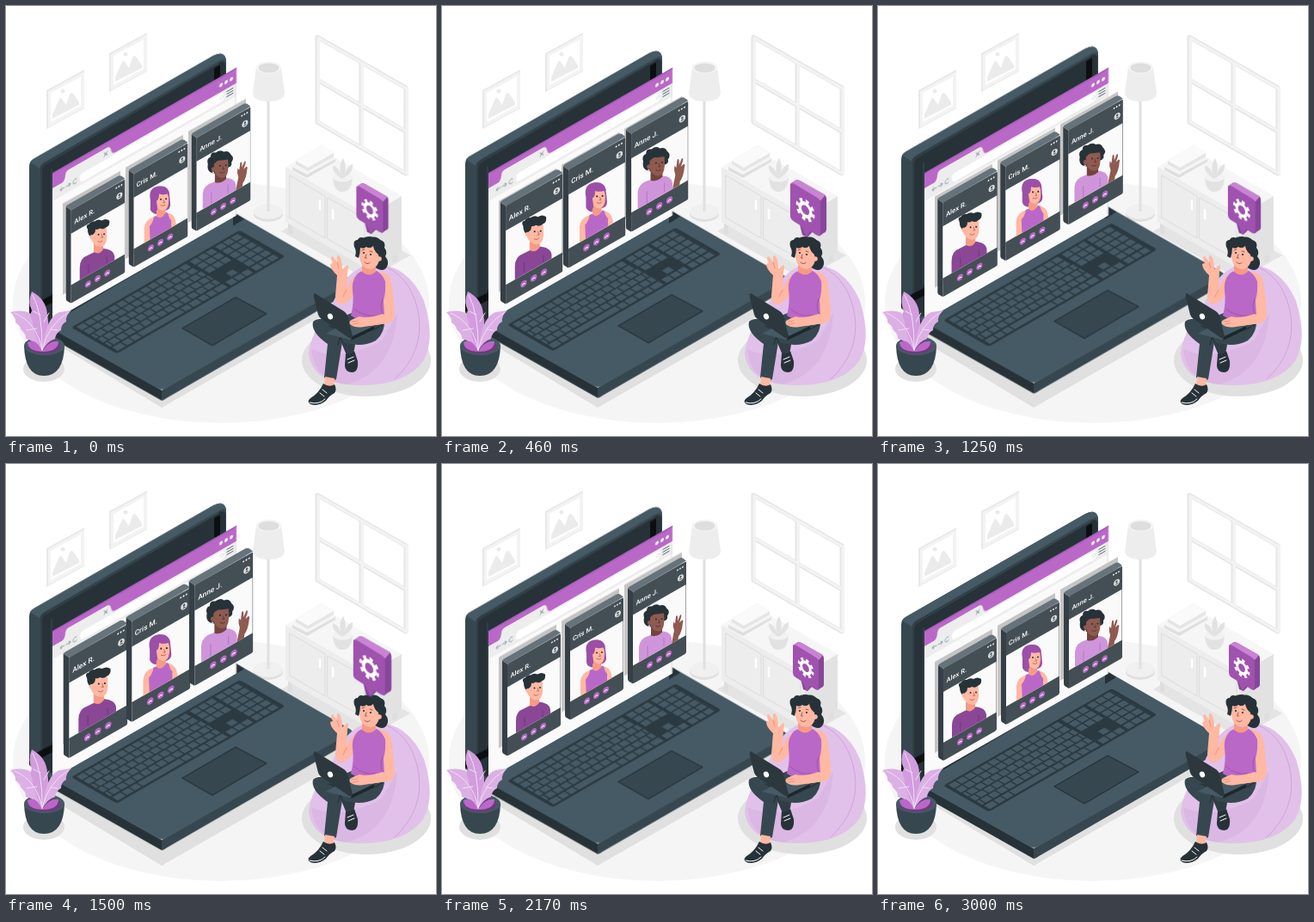
An HTML page without scripts that plays this animation: 500 px wide and 500 px high, repeating every 3.04 s.

```html
<!DOCTYPE html>
<html lang="en">
<head>
<meta charset="utf-8">
<title>Video call</title>
<style>
html, body { margin: 0; width: 100%; height: 100%; overflow: hidden; background: #fff; }
svg { display: block; width: 100%; height: 100%; }
.float, .beat, .pulse { animation: float 3.04s linear -40ms infinite; }
.beat { animation-name: beat; transform-origin: 104px 272px; }
.pulse { animation-name: beat; --peak: 1.25; transform-origin: 426px 236px; }
@keyframes float { 50% { transform: translateY(-10px); } }
@keyframes beat {
  0%, 30%, 40%, 60%, 100% { transform: scale(1); }
  10%, 50% { transform: scale(var(--peak, 1.1)); }
}
.name { font: 500 7.6px Roboto, Arial, sans-serif; fill: #fff; }
.keys path { fill: none; stroke: #455a64; stroke-width: 7.6; stroke-dasharray: 9 1.6; }
.line { fill: none; stroke-linecap: round; stroke-linejoin: round; }
</style>
</head>
<body>
<svg viewBox="0 0 500 500">
<defs>
  <clipPath id="photo"><path d="M76 265L138 229.500V288.500L76 324Z"/></clipPath>
  <path id="shade" d="M66 230L133 192V298L66 336Z" fill="#c4c4c4"/>
  <g id="btn"><circle r="3.500" fill="#ba68c8"/><path class="line" d="M-1.500.8Q0-1 1.500.8" stroke="#fff"/></g>
  <g id="card">
    <path d="M70 234L76 238V345L71 342Q70 341 70 339Z" fill="#353f45"/>
    <path d="M70 234L72 232L130 199Q132 198 134 199L138 202L76 238Z" fill="#66737a"/>
    <g transform="matrix(1 -.572 0 1 76 238)">
      <rect width="62" height="107" rx="1.500" fill="#444f55"/>
      <rect width="61.500" y="27" height="59" fill="#fafafa"/>
      <g fill="#fff"><circle cx="52" cy="4.500" r=".9"/><circle cx="55" cy="4.500" r=".9"/><circle cx="58" cy="4.500" r=".9"/>
      <circle cx="55.500" cy="15.500" r="3.500" fill="#e0e0e0"/></g>
      <circle cx="55.500" cy="14.500" r="1.200" fill="#444f55"/><path d="M53.500 17.500q2-2.500 4 0z" fill="#444f55"/>
      <use href="#btn" x="19.500" y="96"/><use href="#btn" x="30.500" y="96"/><use href="#btn" x="41.500" y="96"/>
    </g>
  </g>
  <g id="pic">
    <path d="M47 98L91 74V119L47 143Z" fill="#e8e8e8"/>
    <path d="M49 99L91 76V118L49 141Z" fill="#f3f3f3"/>
    <path d="M52 101L87 82V116L52 135Z" fill="#fff"/>
    <path d="M54 131V126L62 108Q64 105 67 111L70 115L74 103Q76 99 79 103L85 112V115Z" fill="#ebebeb"/>
    <circle cx="66" cy="99" r="2.500" fill="#ebebeb"/>
  </g>
</defs>

<rect width="500" height="500" fill="#fff"/>
<ellipse cx="250" cy="345" rx="242" ry="140" fill="#f5f5f5"/>

<!-- wall -->
<use href="#pic"/><use href="#pic" x="73" y="-43"/>
<g class="line" stroke-linecap="butt">
  <path d="M362 36L465 95V195L362 135ZM413 66V165M362 86L465 146" stroke="#e6e6e6" stroke-width="5"/>
  <path d="M363 37L466 96V195L363 135ZM414 66V165M363 86L466 146" stroke="#f3f3f3" stroke-width="3"/>
</g>

<!-- lamp -->
<ellipse cx="305" cy="242" rx="17" ry="9" fill="#e0e0e0"/><ellipse cx="305" cy="239" rx="17" ry="9" fill="#f0f0f0"/>
<path d="M303.500 105H306.500V238Q305 240 303.500 238Z" fill="#e0e0e0"/>
<path d="M291 71L287 102Q289 111 305 111Q322 111 324 102L320 71Z" fill="#ededed"/>
<ellipse cx="305.500" cy="71.500" rx="14.500" ry="7" fill="#f5f5f5"/><ellipse cx="305.500" cy="72" rx="12" ry="5.500" fill="#dedede"/>

<!-- sideboard -->
<path d="M320 262L420 318L470 290L370 232Z" fill="#e4e4e4"/>
<path d="M328 250V264L333 266V252ZM415 298V312L421 314V300ZM449 286V299L455 296V282Z" fill="#dedede"/>
<path d="M325 187L422 243V307L325 251Z" fill="#ededed"/>
<path d="M422 243L460 221V285L422 307Z" fill="#e2e2e2"/>
<path d="M325 187L363 165L460 221L422 243Z" fill="#f6f6f6"/>
<path class="line" d="M330 197L371 221V270L330 246ZM374 223L417 247V295L374 271Z" stroke="#dcdcdc"/>
<path class="line" d="M365 227V236M380 237V247" stroke="#fff" stroke-width="2.500"/>
<path d="M333 187L366 168L383 178V181L350 200L333 191Z" fill="#dfdfdf"/><path d="M333 187L366 168L383 178L350 196Z" fill="#f5f5f5"/>
<path d="M337 180L367 162L381 171V175L351 192L337 184Z" fill="#e5e5e5"/><path d="M337 180L367 162L381 171L351 188Z" fill="#fafafa"/>
<path d="M380 199Q381 216 391 216Q402 216 403 199Z" fill="#e2e2e2"/><ellipse cx="391.500" cy="199" rx="11.500" ry="5.500" fill="#f2f2f2"/>
<path d="M391 201Q378 193 380 185Q386 187 389 195Q387 183 392 177Q396 184 394 195Q397 185 403 184Q405 193 391 201Z" fill="#e2e2e2"/>

<path d="M40 382L181 467L408 337L270 258Z" fill="#e0e0e0"/>

<!-- laptop -->
<g class="float">
  <path d="M27 352V187Q27 181 32 178L241 58Q256 51 256 66V258L52 376L27 360Z" fill="#37474f"/>
  <path d="M28 182Q29 180 32 178L241 58Q254 51 256 63Q253 61 248 64L46 181Q40 184 39 189Z" fill="#455a64"/>
  <path d="M40 362V193Q40 186 45 183L248 66Q255 63 255 70V250L54 370Z" fill="#263238"/>
  <path d="M242 73L248 69Q249 69 249 71V95H242ZM27 350L54 336V345L27 359Z" fill="#0b0f11"/>
  <path class="line" d="M41 342V193Q41 187 46 184L247 67M53 333V190" stroke="#43545c" stroke-width=".8"/>

  <path d="M48 372L181 447V459L52 386Q48 384 48 380Z" fill="#263238"/>
  <path d="M181 447L403 320V328Q403 331 400 333L187 456Q183 459 181 459Z" fill="#37474f"/>
  <path d="M50 371L262 246L268 242L400 318Q404 320 400 323L187 444Q181 448 175 444L50 374Z" fill="#455a64"/>
  <path d="M264 239L268 242L277 248L264 256Z" fill="#263238"/>
  <g transform="matrix(.866 -.5 .866 .5 76 374)">
    <rect width="226" height="61" rx="3" fill="#2b3940"/>
    <g class="keys">
      <path d="M4 6.500H152M4 16H152" />
      <path d="M4 25.500H152" stroke-dashoffset="-5"/>
      <path d="M4 35H152" stroke-dashoffset="3"/>
      <path d="M4 44.500H152" stroke-dashoffset="6"/>
      <path d="M4 54.500H152" style="stroke-dasharray:11 1.600 9 1.600 9 1.600 56 1.600 9 1.600"/>
      <path d="M156 6.500H186M156 16H186M156 25.500H186M156 54.500H186M166.600 44.500H175.600"/>
      <path d="M190 6.500H222M190 16H222M190 25.500H222M190 35H222M190 44.500H222M190 54.500H222"/>
    </g>
  </g>
  <path d="M205 375L267 339L303 358L240 395Z" fill="#37474f" stroke="#263238" stroke-width="1.200" stroke-linejoin="round"/>
</g>

<!-- browser window -->
<g transform="matrix(1 -.572 0 1 54 194)">
  <rect width="214" height="172" fill="#fafafa"/>
  <rect width="214" y="16" height="17" fill="#ededed"/>
  <rect width="214" height="18" fill="#ba68c8"/>
  <path d="M0 0H214V2H0Z" fill="#a95db8"/>
  <path d="M11 18Q14 18 15 12Q15 7 19 7H63Q67 7 68 12Q69 18 73 18Z" fill="#ededed"/>
  <path class="line" d="M60 11.500l4 4m0-4l-4 4" stroke="#546e7a" stroke-width=".8"/>
  <g fill="#fff"><circle cx="196" cy="10" r="2"/><circle cx="202" cy="10" r="2"/><circle cx="208" cy="10" r="2"/></g>
  <rect x="32" y="20" width="168" height="10" rx="4" fill="#fff"/>
  <circle cx="197" cy="25" r="1.800" class="line" stroke="#cfcfcf" stroke-width=".6"/>
  <path class="line" d="M203 21.500H210M203 24.500H210M203 27.500H210" stroke="#546e7a" stroke-width="1.200"/>
  <path class="line" d="M14 25H9l2-2m-2 2l2 2M16 25h5l-2-2m2 2l-2 2M28 23a2.500 2.500 0 1 0 0 4" stroke="#78909c" stroke-width=".8"/>
  <path d="M213 18V172" stroke="#e0e0e0"/>
</g>

<!-- call cards -->
<g class="float">
  <use href="#shade"/><use href="#shade" x="73" y="-42"/><use href="#shade" x="146" y="-84"/>

  <g class="beat">
    <use href="#card"/>
    <text class="name" transform="matrix(1 -.572 0 1 79.500 254.500)">Alex R.</text>
    <g clip-path="url(#photo)">
      <path d="M86 326V304Q86 293 95 290L103 286L112 282Q125 283 126 291V310Z" fill="#8a4796"/>
      <path class="line" d="M96 310V300M117 299V292" stroke="#71387c"/>
      <path d="M102 273V286Q108 290 113 283V275Z" fill="#f59b85"/>
      <path d="M98 260Q99 254 109 253Q118 254 117 265Q118 279 110 280Q101 280 98 268Z" fill="#ffb8a2"/>
      <path d="M95 260Q92 255 97 254Q98 250 103 251Q107 248 111 250Q116 247 120 250Q121 256 116 258Q113 261 109 259Q106 261 104 260Q104 265 101 266L100 270Q95 267 95 260Z" fill="#263238"/>
      <circle cx="100" cy="269" r="2.600" fill="#ffb8a2"/>
      <g fill="#263238"><circle cx="107.500" cy="266" r="1"/><circle cx="114" cy="265.500" r="1"/></g>
      <path class="line" d="M111 266l1.500 3.500h-2M107 274q3 2 5-.5" stroke="#b75b50" stroke-width=".8"/>
    </g>
  </g>

  <g transform="translate(73 -42)"><g class="beat">
    <use href="#card"/>
    <text class="name" transform="matrix(1 -.572 0 1 79 253.500)">Cris M.</text>
    <g clip-path="url(#photo)"><g transform="translate(-73 42)">
      <path d="M168 226Q165 212 177 210Q189 209 190 221L191 231Q191 237 185 238L174 242Q167 240 168 234Z" fill="#9b4fa9"/>
      <path d="M161 280V258Q162 248 173 245L185 240Q195 241 197 250L199 264Z" fill="#ffb8a2"/>
      <path d="M168 280L167 256Q171 252 172 245L175 244Q180 249 186 240L188 241Q190 248 192 249V270Z" fill="#ba68c8"/>
      <path d="M175 232V244Q180 249 185 241V232Z" fill="#f59b85"/>
      <path d="M174 222Q175 214 181 215Q189 215 189 226Q189 238 182 238Q175 237 174 227Z" fill="#ffb8a2"/>
      <path d="M172 232Q166 218 175 211Q187 207 190 218Q183 221 178 219Q178 226 175 227L176 234Q177 240 171 240Z" fill="#9b4fa9"/>
      <g fill="#263238"><circle cx="180" cy="225" r="1"/><circle cx="186" cy="224.500" r="1"/></g>
      <path class="line" d="M183 226l1.500 3h-2M180 232q3 1.500 5-.5" stroke="#b75b50" stroke-width=".8"/>
    </g></g>
  </g></g>

  <g transform="translate(146 -84)"><g class="beat">
    <use href="#card"/>
    <text class="name" transform="matrix(1 -.572 0 1 79.500 254)">Anne J.</text>
    <g clip-path="url(#photo)"><g transform="translate(-146 84)">
      <path d="M229 241V218Q230 208 241 205L255 200Q266 200 267 208V225Z" fill="#cf95da"/>
      <path class="line" d="M239 232V217M258 217V208" stroke="#b477c0"/>
      <path d="M267 214L270 199Q268 194 269 189L271 191L272 183Q273 180 274 183V188L277 181Q279 180 278 184L276 190L279 187Q281 187 280 190Q279 201 275 206L274 215Z" fill="#8f5a50"/>
      <path d="M243 191V205Q250 207 256 201V192Z" fill="#73443d"/>
      <path d="M235 184Q233 178 238 176Q238 170 244 171Q249 167 253 170Q259 168 261 173Q266 177 262 182Q263 187 258 188L243 195Q233 194 235 184Z" fill="#263238"/>
      <path d="M242 184Q246 179 250 180L258 179Q260 199 252 200Q244 200 242 191Z" fill="#8f5a50"/>
      <circle cx="241.500" cy="190" r="2.500" fill="#8f5a50"/><circle cx="241" cy="194" r="1.200" fill="#e1bee7"/>
      <g fill="#263238"><circle cx="249" cy="186" r="1"/><circle cx="255.500" cy="185.500" r="1"/></g>
      <path class="line" d="M252 187l1.500 3h-2M249 194q3 1.500 5-.5" stroke="#56302b" stroke-width=".8"/>
    </g></g>
  </g></g>
</g>

<!-- plant -->
<ellipse cx="44" cy="422" rx="24" ry="15" fill="#e0e0e0"/>
<path d="M21 395Q22 430 44 430Q67 430 68 395Z" fill="#37474f"/>
<ellipse cx="44.500" cy="395" rx="23.500" ry="11" fill="#455a64"/><ellipse cx="44.500" cy="396" rx="19" ry="8" fill="#71387c"/>
<g fill="#dcb0e5">
  <path d="M42 401Q32 388 23 387Q24 382 17 376Q17 372 11 368Q12 363 5 356Q25 351 35 363Q44 374 42 401Z"/>
  <path d="M42 402Q31 377 31 367Q27 360 30 354Q25 344 30 332Q47 341 48 359Q52 377 42 402Z" fill="#d29ddd"/>
  <path d="M42 402Q46 362 62 356L76 354Q69 360 70 367Q64 370 64 377Q58 380 57 387Q47 390 42 402Z"/>
  <path d="M42 402Q25 401 25 391Q35 385 42 402Z" fill="#ba68c8"/>
  <path d="M42 402Q50 388 61 390Q61 402 42 402Z" fill="#ba68c8"/>
</g>
<path class="line" d="M42 400Q36 368 10 357M42 400Q43 358 31 336M42 400Q49 370 73 356M36 375l-12 2M40 359l-8-4M44 367l6-10M52 376l8 1" stroke="#f1dff5"/>

<!-- bean bag -->
<ellipse cx="419" cy="412" rx="75" ry="42" fill="#e0e0e0"/>
<path d="M352 404Q354 380 377 354Q394 302 428 300Q468 301 486 343Q500 388 485 413Q464 441 414 441Q356 441 352 404Z" fill="#e1c1e9"/>
<path d="M355 399Q389 415 437 389L455 357Q451 424 397 440Q359 437 355 399Z" fill="#dbb7e4"/>
<path class="line" d="M443 304Q473 318 480 360Q486 402 452 434" stroke="#d0a3db"/>

<!-- woman -->
<path d="M385 374L407 388L404 405L396 406L391 394Z" fill="#2f3d44"/>
<path d="M395 404Q402 406 405 401L409 413Q410 426 402 426Q394 425 394 418Z" fill="#263238"/>
<path class="line" d="M397 411l7-3M398 415l7-3" stroke="#fff"/>
<path d="M402 357L440 364Q441 380 430 389Q414 398 391 391L384 434Q377 438 370 432L374 393Q354 379 357 367Q364 361 379 366Z" fill="#37474f"/>
<path class="line" d="M438 370Q423 382 396 379Q388 381 386 394M376 372Q388 376 391 391" stroke="#263238" stroke-width="1.300"/>
<path d="M371 431L382 433L381 444H370Z" fill="#ffb8a2"/>
<path d="M369 439Q376 444 382 440Q385 446 382 450Q376 453 372 459Q363 466 354 463Q349 460 354 456Q364 450 369 439Z" fill="#263238"/>
<path class="line" d="M365 450l5 4M368 446l5 4M353 461Q364 464 371 457" stroke="#fff"/>
<path d="M409 311L401 319L396 329L397 309Q399 302 397 301L391 306Q391 294 387 290Q384 289 385 298L380 291Q376 291 380 299L377 300Q377 306 385 313L383 337Q383 347 391 347Q399 345 407 331Z" fill="#ffb8a2"/>
<path class="line" d="M396 330L392 338M385 298l2 7" stroke="#e88b78" stroke-width=".8"/>
<path d="M432 309Q445 309 448 320Q451 341 452 358Q452 367 443 369L416 373Q406 375 400 370Q398 366 404 364L411 361Q420 364 438 358L435 335Z" fill="#ffb8a2"/>
<path d="M406 315Q409 309 416 308H431Q437 311 441 320Q442 332 439 342L440 362Q420 372 401 360Q405 344 403 331Q402 321 406 315Z" fill="#ba68c8"/>
<path class="line" d="M438 340Q434 350 438 358M405 352Q416 362 430 360" stroke="#9e54ab"/>
<path d="M414 298V309Q422 316 430 309V298Z" fill="#f59b85"/>
<path d="M409 278Q406 270 414 271Q418 267 424 269Q431 267 435 272Q442 274 440 281Q444 286 441 291Q446 297 443 303Q440 309 433 306Q428 305 427 295Z" fill="#263238"/>
<path d="M412 278Q416 272 424 274Q437 275 435 291Q433 305 424 306Q412 305 411 291Z" fill="#ffb8a2"/>
<path d="M405 280Q403 272 409 272Q411 267 417 270Q424 266 428 270Q439 269 439 284Q440 291 434 297L433 289Q428 285 427 279Q423 283 419 280Q416 283 412 281Q412 287 410 293L406 291Q408 285 405 280Z" fill="#263238"/>
<circle cx="434" cy="294" r="2.800" fill="#ffb8a2"/>
<g fill="#263238"><circle cx="416" cy="287" r="1.100"/><circle cx="424" cy="289" r="1.100"/></g>
<path class="line" d="M419 289l-1.500 4h2M414 284l3-1M423 285l3 1M417 298q3 3 6 .5" stroke="#9f4c43" stroke-width=".9"/>
<path d="M372 381L400 388L428 373L404 363Z" fill="#455a64"/>
<path d="M359 334Q357 335 358 339L363 359Q364 362 367 364L399 386Q404 388 403 384L397 360Q396 357 393 355Z" fill="#2c383e"/>
<path d="M403 384L428 372V376L401 389Z" fill="#1d272c"/>
<ellipse cx="377" cy="361" rx="3" ry="3.600" fill="#fff" transform="rotate(-25 377 361)"/>
<path d="M438 358L450 364Q448 368 443 369L416 373Q406 375 400 370Q398 366 404 364L411 361Q420 364 438 358Z" fill="#ffb8a2"/>
<path class="line" d="M402 367l7-1M403 370l7-1" stroke="#e88b78" stroke-width=".8"/>

<!-- settings bubble -->
<g class="pulse">
  <path d="M408 211L414 207Q416 207 418 208L442 222Q444 223 444 226V256Q444 259 441 260L437 263L431 258L425 264L420 262Z" fill="#87469a"/>
  <path d="M408 211L414 207Q416 207 418 208L443 222L438 228Z" fill="#c884d3"/>
  <path d="M408 213Q408 209 412 211L435 225Q438 227 438 230V260Q438 264 434 262L428 258L424 264L419 253L411 248Q408 246 408 243Z" fill="#a052af"/>
  <g transform="matrix(.87 .5 0 1 423 237)" fill="none" stroke="#fff">
    <circle r="6.200" stroke-width="3.400"/><circle r="9" stroke-width="3.500" stroke-dasharray="3.534"/>
  </g>
</g>
</svg>
</body>
</html>
```
